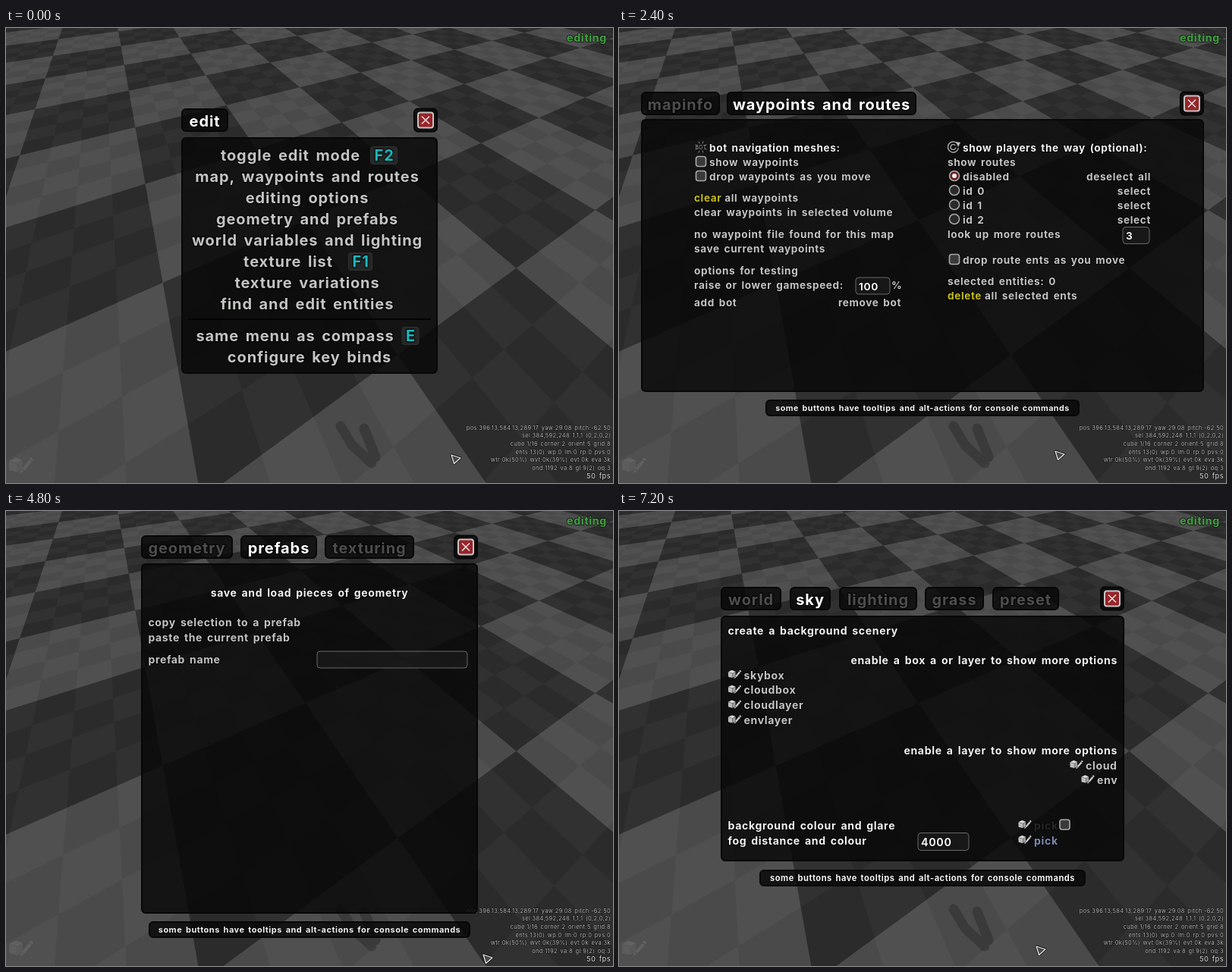
An HTML page with a canvas for the animation above (8000 ms loop, 800 by 600 pixels).

```html
<!DOCTYPE html>
<html>
<head>
<meta charset="utf-8">
<style>
html, body { margin: 0; width: 100%; height: 100%; overflow: hidden; background: #222; }
canvas { display: block; width: 800px; height: 600px; }
</style>
</head>
<body>
<canvas id="stage" width="800" height="600"></canvas>
<script>
const ctx = document.getElementById('stage').getContext('2d');
const CYAN = '#1bb8bd', YELLOW = '#c6be16', WHITE = '#f2f2f2', GRAY = '#c2c4c2', DIM = '#4c4d4c';
const STEP = 800;

// Perspective checkerboard, traced back from the screen to the ground plane.
function paintFloor({ w, h, f, pitch, yaw, tile, u0, v0, shades }) {
  const cv = document.createElement('canvas');
  cv.width = w; cv.height = h;
  const g = cv.getContext('2d'), img = g.createImageData(w, h);
  const s = Math.sin(pitch), c = Math.cos(pitch), sy = Math.sin(yaw), cy = Math.cos(yaw);
  const shade = (dx, dy) => {
    const d = f * s + dy * c;
    if (d <= 0) return 0;
    const fw = (f * c - dy * s) / d, lat = dx / d;
    const u = (lat * cy + fw * sy - u0) / tile, v = (fw * cy - lat * sy - v0) / tile;
    const big = (Math.floor(u) + Math.floor(v)) & 1;
    const small = (Math.floor(u * 4) + Math.floor(v * 4)) & 1;
    return shades[big * 2 + small];
  };
  for (let y = 0, k = 0; y < h; y++) {
    for (let x = 0; x < w; x++, k += 4) {
      let sum = 0;
      for (let n = 0; n < 4; n++) sum += shade(x + .25 + (n & 1) / 2 - w / 2, y + .25 + (n >> 1) / 2 - h / 2);
      img.data[k] = img.data[k + 1] = img.data[k + 2] = sum / 4;
      img.data[k + 3] = 255;
    }
  }
  g.putImageData(img, 0, 0);
  return cv;
}

// Camera 33.17 units above the floor, 120 degree view, tiles of 32 units.
const rad = Math.PI / 180, eye = 33.17;
const ground = paintFloor({ w: 800, h: 600, f: 400 / Math.tan(60 * rad), pitch: 62.5 * rad, yaw: 29.08 * rad,
  tile: 32 / eye, u0: (12.13 - 32) / eye, v0: -8.13 / eye, shades: [43, 49, 80, 74] });
const previewGround = paintFloor({ w: 316, h: 316, f: 158, pitch: 30 * rad, yaw: 29.4 * rad,
  tile: .65, u0: .1, v0: .1, shades: [98, 128, 178, 158] });

function setFont(size, weight = 700) {
  ctx.font = `${weight} ${size}px Inter, "Noto Sans", sans-serif`;
  ctx.letterSpacing = size * .045 + 'px';
  ctx.wordSpacing = size * .15 + 'px';
}

// Braces in the string mark the highlighted part.
function text(str, x, y, size, color = GRAY, align = 'left', weight = 700, accent = CYAN) {
  setFont(size, weight);
  const parts = str.split(/[{}]/);
  const width = ctx.measureText(parts.join('')).width;
  if (align === 'right') x -= width;
  if (align === 'center') x -= width / 2;
  ctx.lineJoin = 'round';
  ctx.lineWidth = size * .14;
  ctx.strokeStyle = 'rgba(0,0,0,.55)';
  parts.forEach((part, i) => {
    ctx.strokeText(part, x, y + size * .36);
    ctx.fillStyle = i % 2 ? accent : color;
    ctx.fillText(part, x, y + size * .36);
    x += ctx.measureText(part).width;
  });
}

function box(x, y, w, h, r, fill, stroke, line = 1) {
  ctx.beginPath();
  ctx.roundRect(x, y, w, h, r);
  if (fill) { ctx.fillStyle = fill; ctx.fill(); }
  if (stroke) { ctx.strokeStyle = stroke; ctx.lineWidth = line; ctx.stroke(); }
}

function poly(points, fill, stroke, line = 1) {
  ctx.beginPath();
  points.forEach(p => ctx.lineTo(...p));
  ctx.closePath();
  if (fill) { ctx.fillStyle = fill; ctx.fill(); }
  if (stroke) { ctx.strokeStyle = stroke; ctx.lineWidth = line; ctx.stroke(); }
}

function checkQuad([a, b, c, d], nx, ny, colors) {
  const mix = (p, q, t) => [p[0] + (q[0] - p[0]) * t, p[1] + (q[1] - p[1]) * t];
  const at = (u, v) => mix(mix(a, b, u), mix(d, c, u), v);
  for (let i = 0; i < nx; i++) for (let j = 0; j < ny; j++) {
    const [l, r, t, m] = [i / nx, (i + 1) / nx, j / ny, (j + 1) / ny];
    poly([at(l, t), at(r, t), at(r, m), at(l, m)], colors[(i + j) & 1]);
  }
}

const glass = (x, y, w, h) => box(x, y, w, h, 5, 'rgba(4,5,4,.8)', '#060706', 2);

function key(label, x, y, size, align = 'center') {
  setFont(size);
  const w = ctx.measureText(label).width + size * .45, h = size * 1.14;
  const left = align === 'right' ? x - w : x - w / 2;
  box(left, y - h / 2, w, h, 3, '#252727', '#303232');
  text(label, left + w / 2 + size * .03, y, size, CYAN, 'center');
  return left;
}

function keys(labels, x, y, size) {
  labels.split('|').reverse().forEach((label, i) => {
    if (i) { text('|', x - 4, y, size * .8, GRAY, 'center'); x -= 9; }
    x = key(label, x, y, size, 'right');
  });
}

function closeButton(x, y) {
  glass(x - 15, y - 15, 30, 30);
  box(x - 10, y - 10, 20, 20, 3, '#96242a', '#c8c2c0', 2);
  ctx.beginPath();
  for (const d of [-5, 5]) { ctx.moveTo(x - 5, y - d); ctx.lineTo(x + 5, y + d); }
  ctx.strokeStyle = '#e6dede'; ctx.lineWidth = 1.6; ctx.stroke();
}

// tabs: [label, left, width]
function windowFrame(x, y, w, h, tabs, active, tabY, closeX) {
  tabs.forEach(([label, left, width], i) => {
    glass(left, tabY, width, 29);
    text(label, left + width / 2, tabY + 15.5, 20, i === active ? '#fff' : DIM, 'center');
  });
  closeButton(closeX, tabY + 14.5);
  glass(x, y, w, h);
}

function tooltip(x, y, w, size) {
  glass(x, y, w, 20);
  text('some buttons have tooltips and alt-actions for console commands', 400, y + 10.5, size, WHITE, 'center');
}

function input(x, y, w, h, value = '', size = 13.6) {
  box(x, y - h / 2, w, h, 4, 'rgba(30,31,30,.6)', '#676967');
  text(value, x + 4, y + 1, size, WHITE);
}

const checkbox = (x, y) => box(x - 6.5, y - 6.5, 13, 13, 3, '#3a3a3a', '#a9a9a9', 1.6);

function radio(x, y, on) {
  ctx.beginPath(); ctx.arc(x, y, 6.5, 0, 7);
  ctx.fillStyle = on ? '#6d2024' : '#292a29'; ctx.fill();
  ctx.strokeStyle = '#a9a9a9'; ctx.lineWidth = 1.5; ctx.stroke();
  if (on) { ctx.beginPath(); ctx.arc(x, y, 3, 0, 7); ctx.fillStyle = '#eee'; ctx.fill(); }
}

function cubeIcon(x, y, s, alpha = 1) {
  ctx.save();
  ctx.translate(x, y); ctx.scale(s, s);
  ctx.globalAlpha = alpha;
  poly([[-32, -12], [-14, -21], [4, -14], [-10, -6]], '#d8d8d8');
  poly([[-32, -11], [-11, -5], [-11, 17], [-31, 12]], '#bdbdbd');
  poly([[-10, -5], [4, -13], [4, 9], [-10, 17]], '#9e9e9e');
  poly([[2, 8], [21, -15], [28, -9], [8, 14]], '#d0d0d0', '#333', 1);
  poly([[22, -17], [26, -21], [32, -16], [29, -11]], '#e0e0e0');
  poly([[1, 10], [7, 16], [-4, 20]], '#dedede', '#333', .7);
  ctx.restore();
}

const STATS = [
  'pos:396.13,584.13,289.17 yaw:29.08 pitch:-62.50',
  'sel:384,592,248 1,1,1 (0,2,0,2)',
  'cube:1/16 corner:2 orient:5 grid:8',
  'ents:13(0) wp:0 lm:0 rp:0 pvs:0',
  'wtr:0k(50%) wvt:0k(39%) evt:0k eva:3k',
  'ond:1192 va:8 gl:9(2) oq:3'
];

function playerShadow() {
  ctx.beginPath();
  ctx.moveTo(441, 525); ctx.lineTo(456, 550); ctx.lineTo(482, 574);
  ctx.moveTo(472, 528); ctx.lineTo(487, 566);
  ctx.lineCap = ctx.lineJoin = 'round';
  ctx.strokeStyle = 'rgba(20,21,20,.3)'; ctx.lineWidth = 13; ctx.stroke();
  ctx.lineCap = 'butt';
}

function background() {
  ctx.drawImage(ground, 0, 0);
  playerShadow();
  cubeIcon(20, 577, .5, .13);
  text('editing', 792, 13, 14.3, '#3fa03f', 'right');
  STATS.forEach((line, i) => text(line, 797, 527 + i * 10.6, 7.5, '#b4b4b4', 'right', 400));
  text('50 fps', 797, 591, 9.2, '#c8c8c8', 'right', 500);
}

function editMenu() {
  windowFrame(232, 145, 336, 310, [['edit', 232, 60]], 0, 107, 553);
  const row = (str, x, y) => text(str, x, y, 20, GRAY, 'center');
  row('toggle edit mode', 375, 168);
  key('F2', 498, 168, 20);
  ['map, waypoints and routes', 'editing options', 'geometry and prefabs', 'world variables and lighting']
    .forEach((s, i) => row(s, 397, 196 + i * 28));
  row('texture list', 372, 308);
  key('F1', 467, 308, 20);
  row('texture variations', 397, 336);
  row('find and edit entities', 397, 364);
  ctx.fillStyle = '#020302';
  ctx.fillRect(240, 383, 320, 2);
  row('same menu as compass', 381, 406);
  key('E', 533, 406, 20);
  row('configure key binds', 400, 434);
}

function compass() {
  ctx.fillStyle = 'rgba(0,0,0,.5)';
  ctx.fillRect(0, 0, 800, 600);
  const arc = (a, b, color) => {
    ctx.beginPath(); ctx.arc(400, 299, 70.5, a, b);
    ctx.strokeStyle = color; ctx.lineWidth = 4; ctx.stroke();
  };
  arc(0, 7, 'rgba(72,74,72,.82)');
  arc(.4, 1.16, '#431414');
  cubeIcon(400, 300, 1);
  text('editing', 400, 291, 14.2, '#fff', 'center');
  [
    ['Q', 399, 189, '{Q}uit editing', 400, 'center'],
    ['F', 331, 219, '{f}ind and edit entities', 340, 'right'],
    ['R', 467, 219, 'map, waypoints and {r}outes', 460, 'left'],
    ['T', 301, 293, '{t}exture list', 310, 'right'],
    ['D', 497, 293, 'e{d}iting options', 490, 'left'],
    ['V', 331, 367, 'texture {v}ariations', 340, 'right'],
    ['W', 399, 397, '{w}orld and lighting', 400, 'center']
  ].forEach(([k, kx, ky, label, x, align]) => {
    key(k, kx, ky, 10);
    text(label, x, ky + 14.5, 10, '#747574', align);
  });
  key('G', 470, 370, 14.5);
  text('{g}eometry and prefabs', 460, 390.5, 14.5, '#d2d2d2');
  key('E', 378, 453, 10);
  text('{e}scape', 389, 453.5, 10.4, '#a8a8a8');
}

function mapPreview() {
  box(43, 134, 332, 332, 6, '#858785');
  ctx.save();
  box(52, 142, 315, 315, 4, '#000');
  ctx.clip();
  ctx.save();
  poly([[79, 262], [105, 258], [117, 277], [225, 258], [367, 318], [367, 457], [52, 457]]);
  ctx.clip();
  ctx.drawImage(previewGround, 52, 142);
  ctx.restore();
  checkQuad([[52, 235], [68, 235], [74, 457], [52, 457]], 2, 12, ['#969696', '#6b6b6b']);
  checkQuad([[68, 235], [79, 262], [76, 457], [72, 457]], 1, 11, ['#5d5d5d', '#777']);
  const green = ['#17a51b', '#075c0a'], red = ['#b91616', '#6f0b0b'], gold = ['#bcb51b', '#77730b'];
  checkQuad([[157, 233], [180, 230], [188, 234], [165, 238]], 2, 2, green);
  checkQuad([[157, 233], [165, 238], [165, 261], [158, 256]], 2, 2, red);
  checkQuad([[165, 238], [188, 234], [189, 256], [165, 261]], 2, 2, gold);
  checkQuad([[236, 262], [266, 254], [312, 267], [276, 281]], 4, 4, green);
  checkQuad([[236, 262], [276, 281], [268, 327], [233, 301]], 2, 2, red);
  checkQuad([[276, 281], [312, 267], [306, 301], [268, 327]], 2, 2, gold);
  for (let i = 0; i < 7; i++) box(52, 142, 315, 315, 4, null, 'rgba(0,0,0,.2)', 1 + i * 2.6);
  ctx.restore();
}

function mapWindow(active) {
  windowFrame(30, 121, 740, 358, [['mapinfo', 30, 102], ['waypoints and routes', 143, 248]], active, 85, 755);
  tooltip(194, 491, 412, 10.7);
}

const SMALL = 13.6;

function mapInfo() {
  mapWindow(0);
  mapPreview();
  ['', '', 'maps/nix', '', '4', '0', '0'].forEach((v, i) => input(401, 164 + i * 23.9, 198, 22, v));
  ['map title', 'map author', 'file name', 'music', 'players', 'max players']
    .forEach((s, i) => text(s, 620, 162.5 + i * 23.9, SMALL, WHITE));
  text('pick', 762, 234.5, SMALL, GRAY, 'right');
  checkbox(629, 305);
  text('asymmetric map', 640, 306, SMALL);
  ['map revision: 7', 'bounding box size: 1024', 'map size (power): 10', 'map file format version: 43']
    .forEach((s, i) => text(s, 401, 334.5 + i * 19, SMALL, WHITE));
  text('save the map', 728, 334.5, SMALL, GRAY, 'right');
  key('F8', 746, 334.5, SMALL);
  text('increase', 757, 353.5, SMALL, GRAY, 'right');
  text('shrink where empty', 757, 372.5, SMALL, GRAY, 'right');
  text('edit the config file', 401, 420, SMALL);
  ctx.beginPath();
  ctx.arc(409.5, 438.5, 7, 0, 7);
  ctx.moveTo(405, 443); ctx.lineTo(414, 434);
  ctx.strokeStyle = '#c4c4c4'; ctx.lineWidth = 1.5; ctx.stroke();
  text('reset the texture list', 421, 439, SMALL);
}

function waypoints() {
  mapWindow(1);
  text('BOT', 108, 157, 7, '#aaa', 'center', 400);
  ctx.beginPath();
  for (let i = 0; i < 8; i++) {
    const a = (i + .5) * Math.PI / 4;
    ctx.moveTo(108 + 5 * Math.cos(a), 157 + 5 * Math.sin(a));
    ctx.lineTo(108 + 8 * Math.cos(a), 157 + 8 * Math.sin(a));
  }
  ctx.strokeStyle = '#8a8a8a'; ctx.lineWidth = 1; ctx.stroke();
  text('bot navigation meshes:', 119, 158, SMALL, WHITE);
  checkbox(108, 176); text('show waypoints', 119, 177, SMALL);
  checkbox(108, 195); text('drop waypoints as you move', 119, 196, SMALL);
  [['{clear} all waypoints', 224.5], ['clear waypoints in selected volume', 243.5],
   ['no waypoint file found for this map', 272], ['save current waypoints', 291],
   ['options for testing', 320], ['raise or lower gamespeed:', 339], ['add bot', 362.5]]
    .forEach(([s, y]) => text(s, 99, y, SMALL, GRAY, 'left', 700, YELLOW));
  input(312, 340, 45, 22, '100');
  text('%', 359, 339, SMALL);
  text('remove bot', 372, 362.5, SMALL, GRAY, 'right');

  ctx.strokeStyle = '#aaa'; ctx.lineWidth = 1.4;
  for (const r of [7, 3.4]) { ctx.beginPath(); ctx.arc(440.5, 157, r, .2, 5.6); ctx.stroke(); }
  poly([[444, 150], [450, 151], [447, 157]], '#bbb');
  text('show players the way (optional):', 453, 158, SMALL, WHITE);
  text('show routes', 433, 177, SMALL);
  ['disabled', 'id 0', 'id 1', 'id 2'].forEach((s, i) => {
    const y = 196 + i * 19;
    radio(442, y - 1, i === 0);
    text(s, 453, y, SMALL);
    text(i ? 'select' : 'deselect all', 701, y, SMALL, GRAY, 'right');
  });
  text('look up more routes', 433, 272, SMALL);
  input(664, 273.5, 35, 22, '3');
  checkbox(442, 305); text('drop route ents as you move', 453, 306, SMALL);
  text('selected entities: 0', 433, 334, SMALL);
  text('{delete} all selected ents', 433, 353, SMALL, GRAY, 'left', 700, YELLOW);
}

// rows: [line number, label, keys]
function keyRows(rows) {
  rows.forEach(([n, label, bind]) => {
    const y = 98.5 + n * 19.5;
    text(label, 187.5, y, 14);
    if (bind) keys(bind, 608, y, 14);
  });
}

function options() {
  windowFrame(188, 80, 424, 440, [['options', 188, 104]], 0, 42, 597);
  tooltip(189, 533, 422, 11);
  text('editing options', 400, 108, 14, WHITE, 'center');
  ['show the grid', 'show entity icons', 'show selection outline', 'show editing stats', 'snap entities to the grid',
   'show entity directions', 'show entity radius', 'fullbright while editing', 'show wireframe', 'allow passing through geometry']
    .forEach((s, i) => {
      const y = 147 + i * 29;
      checkbox(206, y - 1);
      text(s, 219, y, 14);
    });
}

function geometryWindow(active) {
  windowFrame(179, 70, 442, 460, [['geometry', 179, 119], ['prefabs', 310, 99], ['texturing', 421, 116]], active, 33, 606);
  tooltip(189, 542, 422, 11);
}

function geometry() {
  geometryWindow(0);
  keyRows([
    [0, 'undo', 'Z'], [1, 'redo', 'I|O'],
    [2.5, 'pull cube', 'RIGHTBRACKET|MOUSE5'], [3.5, 'push cube', 'LEFTBRACKET|MOUSE4'],
    [4.5, 'push / pull faces', 'F'], [5.5, 'push / pull corners', 'Q'],
    [7, 'deselect', 'SPACE'], [8, 'deselect only ents', 'END'],
    [9.5, 'delete selection (ents first)', 'BACKSPACE'], [10.5, 'copy', 'C'], [11.5, 'paste', 'V'],
    [12.5, 'cut and paste on release', 'U'],
    [14, 'flip', 'X'], [15, 'rotate via mouse wheel', 'R'],
    [16.5, 'toggle heightmap mode', 'H'], [17.5, 'cycle heightmap brushes via mouse wheel', 'K'],
    [20, 'change via mouse wheel', 'G']
  ]);
  text('copy/paste is scaled by the current grid size: 8', 187.5, 469, 14, WHITE);
  box(188.5, 499, 423, 22, 4, 'rgba(10,11,10,.5)', '#5c5e5c');
  box(325, 502, 16, 16, 3, '#7f807f', '#969796');
}

function prefabs() {
  geometryWindow(1);
  text('save and load pieces of geometry', 400, 108, 14, WHITE, 'center');
  keyRows([[2.5, 'copy selection to a prefab'], [3.5, 'paste the current prefab'], [5, 'prefab name']]);
  input(410, 196, 198, 22, '', 14);
}

function texturing() {
  geometryWindow(2);
  text('apply textures to the selected geometry', 400, 108, 14, WHITE, 'center');
  text('lighting and texturing are closely related', 400, 342, 14, WHITE, 'center');
  keyRows([
    [2.5, 'view the texture list', 'F1'], [3.5, 'cycle textures via mouse wheel', 'Y'],
    [4.5, 'grab texture from selected face', 'J'], [5.5, 'repeat last texture change across the entire map'],
    [7.5, 'create texture variations'], [8.5, 'create a blendmap'],
    [14.5, 'lightmap options'], [15.5, 'create some light entities'], [16.5, 'optimize the geometry', 'F4'],
    [17.5, 'patch existing lightmap', 'F5'], [18.5, 'quick lightmap calculation', 'F6'],
    [19.5, 'full lightmap calculation', 'F7']
  ]);
}

function worldWindow(active) {
  windowFrame(135, 139, 530, 322, [['world', 135, 78], ['sky', 226, 52], ['lighting', 291, 101],
    ['grass', 404, 76], ['preset', 493, 86]], active, 101, 650);
  tooltip(186, 474, 428, 11.1);
}

function world() {
  worldWindow(0);
  text('change the world variables', 143.5, 157.5, 14.1, WHITE);
  ['gravity', 'movement speed', 'liquid speed', 'jump height', 'air friction', 'floor friction']
    .forEach((s, i) => {
      const y = 197 + i * 39;
      text(s, 143.5, y, 14.1);
      box(394, y - 11, 262, 22, 4, 'rgba(10,11,10,.5)', '#5c5e5c');
      box(485, y - 8, 16, 16, 3, '#7f807f', '#969796');
    });
}

function sky() {
  worldWindow(1);
  const size = 14.1;
  const option = (s, x, y, color) => { cubeIcon(x + 9, y - 1, .27); text(s, x + 21, y, size, color); };
  text('create a background scenery', 143.5, 157.5, size, WHITE);
  text('enable a box a or layer to show more options', 657, 197, size, WHITE, 'right');
  ['skybox', 'cloudbox', 'cloudlayer', 'envlayer'].forEach((s, i) => option(s, 143.5, 216.5 + i * 19.8));
  text('enable a layer to show more options', 657, 315.5, size, WHITE, 'right');
  option('cloud', 594, 335.5);
  option('env', 609, 355);
  text('background colour and glare', 143.5, 414.5, size, WHITE);
  text('fog distance and colour', 143.5, 434.5, size, WHITE);
  input(394, 436, 67, 23, '4000', size);
  option('pick', 526, 414.5, '#262726');
  checkbox(587.5, 413.5);
  option('pick', 526, 434.5, '#7d8ab0');
}

function cursor(x, y) {
  const arrow = [[x, y], [x + 12, y + 4], [x + 3.5, y + 11.5]];
  poly(arrow, '#3a3a3a', '#111', 3);
  poly(arrow, '#484848', '#e4e4e4', 1.3);
}

const SCENES = [
  [editMenu, 587, 563], [compass, 575, 557], [mapInfo, 559, 577], [waypoints, 575, 558], [options, 612, 582],
  [geometry, 610, 573], [prefabs, 629, 585], [texturing, 620, 570], [world, 570, 570], [sky, 550, 574]
];

const start = performance.now();
let shown = -1;
function frame() {
  const elapsed = Math.max(0, performance.now() - start);
  const index = Math.floor(elapsed / STEP) % SCENES.length;
  if (index !== shown) {
    const [draw, x, y] = SCENES[index];
    background();
    draw();
    cursor(x, y);
    shown = index;
  }
  requestAnimationFrame(frame);
}
frame();
</script>
</body>
</html>
```
